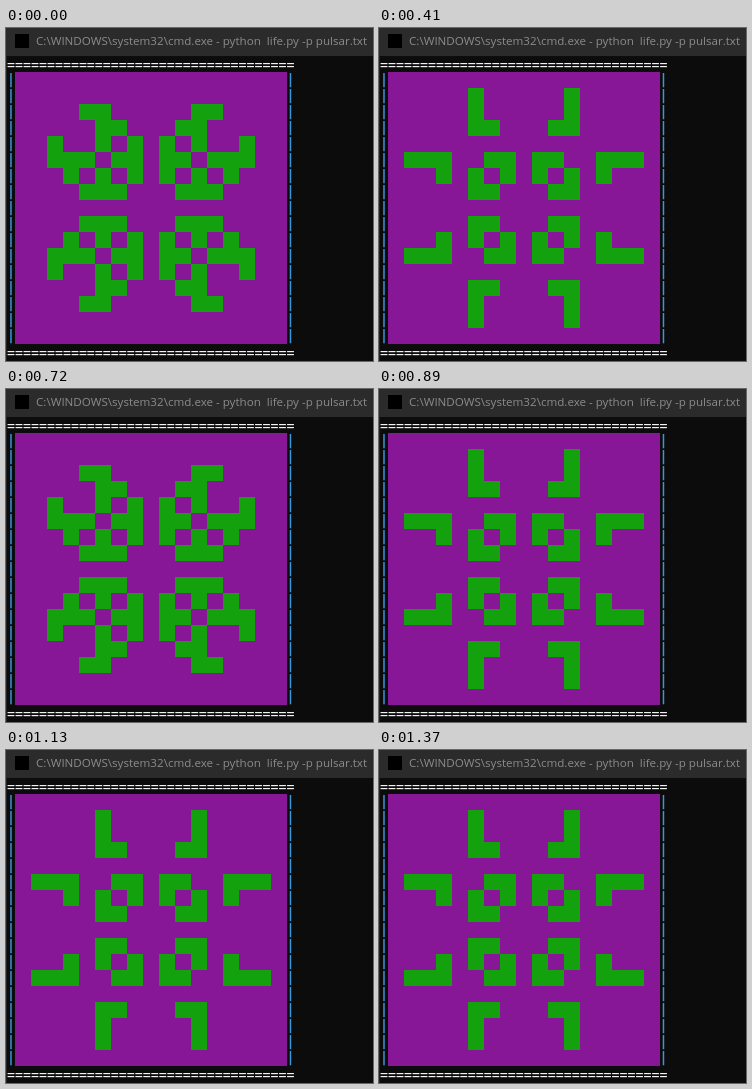
Write an HTML page with a canvas that moves like this. It is 367 px wide and 333 px high and loops after 1.44 s.

```html
<!DOCTYPE html>
<html lang="en">
<head>
<meta charset="utf-8">
<title>Game of Life</title>
<style>
  html, body { margin: 0; width: 100%; height: 100%; overflow: hidden; background: #0c0c0c; }
  header, pre, canvas, .edge, .icon { position: absolute; margin: 0; }
  header {
    left: 0; top: 0; width: 367px; height: 28px; background: #2b2b2b; color: #8c8c8c;
    font: 11.6px/26px "Open Sans", sans-serif; white-space: pre; text-indent: 30px;
  }
  .icon { left: 9px; top: 6px; width: 14px; height: 14px; background: #000; }
  .edge { left: 0; top: 28px; width: 1px; height: 305px; background: #222; }
  pre { left: 1px; top: 28px; color: #3a96dd; font: bold 13.289px/16px "DejaVu Sans Mono", monospace; }
  pre b { position: relative; top: 2px; color: #f2f2f2; font-weight: normal; }
  canvas { left: 9px; top: 44px; }
</style>
</head>
<body>
<header>C:\WINDOWS\system32\cmd.exe - python  life.py -p pulsar.txt</header>
<div class="icon"></div>
<div class="edge"></div>
<pre></pre>
<canvas width="272" height="272"></canvas>
<script>
const SIZE = 17, CELL = 16, LOOP = 1440;
// Moments at which each new generation appears, in ms
const STARTS = [0, 70, 170, 240, 310, 410, 480, 580, 650, 720, 820, 890, 960, 1060, 1130, 1200, 1300, 1370];

const rule = `<b>${"=".repeat(36)}</b>\n`;
const side = `|${" ".repeat(34)}|\n`;
document.querySelector("pre").innerHTML = rule + side.repeat(SIZE) + rule;

const makeGrid = alive => Array.from({ length: SIZE }, (_, y) =>
  Array.from({ length: SIZE }, (_, x) => alive(x, y)));

function step(grid) {
  return makeGrid((x, y) => {
    let near = 0;
    for (let dy = -1; dy <= 1; dy++)
      for (let dx = -1; dx <= 1; dx++)
        if ((dx || dy) && grid[y + dy]?.[x + dx]) near++;
    return near === 3 || (near === 2 && grid[y][x]);
  });
}

// The pulsar is symmetric about the centre: bars 1 and 6 cells out, spanning 2 to 4
const isBar = (a, b) => (a === 1 || a === 6) && b >= 2 && b <= 4;
const bars = makeGrid((x, y) => {
  const dx = Math.abs(x - 8), dy = Math.abs(y - 8);
  return isBar(dx, dy) || isBar(dy, dx);
});
const corners = step(bars);
const phases = [step(corners), bars, corners];

const ctx = document.querySelector("canvas").getContext("2d");

function draw(grid) {
  ctx.fillStyle = "#881798";
  ctx.fillRect(0, 0, SIZE * CELL, SIZE * CELL);
  ctx.fillStyle = "#13a10e";
  grid.forEach((row, y) => row.forEach((alive, x) => {
    if (alive) ctx.fillRect(x * CELL, y * CELL, CELL, CELL);
  }));
}

function tick() {
  const time = performance.now() % LOOP;
  const generation = STARTS.filter(start => start <= time).length - 1;
  draw(phases[generation % phases.length]);
  requestAnimationFrame(tick);
}
tick();
</script>
</body>
</html>
```
